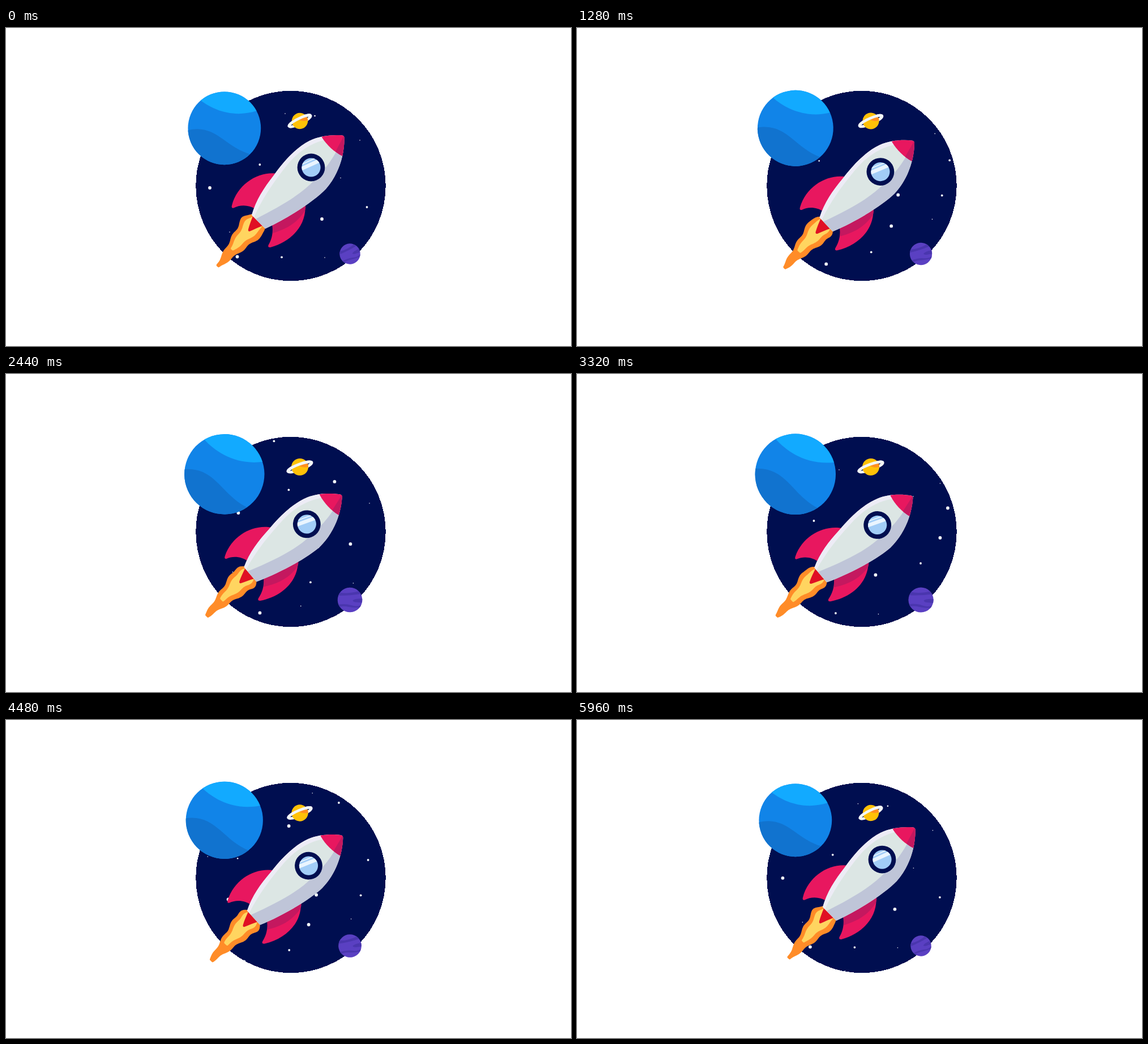
An HTML page that plays this animation: 998 px wide and 561 px high, repeating every 6 s.

```html
<!DOCTYPE html>
<html lang="en">
<head>
<meta charset="utf-8">
<title>Rocket in space</title>
<style>
html, body { margin: 0; width: 100%; height: 100%; overflow: hidden; background: #fff; }
svg { display: block; width: 998px; height: 561px; }
</style>
</head>
<body>
<svg viewBox="0 0 998 561">
  <defs>
    <clipPath id="skyClip"><circle cx="503" cy="278.500" r="167.700"/></clipPath>
    <clipPath id="planetClip"><circle r="64.400"/></clipPath>
    <clipPath id="moonClip"><circle r="18.200"/></clipPath>
    <clipPath id="saturnClip"><circle r="14.200"/></clipPath>
    <clipPath id="glass"><circle cx="539" cy="246" r="16.600"/></clipPath>
    <path id="hull" d="M434 330C442 303 455 283 473 260C489 237 512 211 536 199C554 190 577 188 593 189.300Q597.500 189.700 597.600 194C598 225 587 259 565 284C547 303 503 333 458 354Z"/>
    <clipPath id="hullClip"><use href="#hull"/></clipPath>
  </defs>

  <circle cx="503" cy="278.500" r="167.700" fill="#000e50" shape-rendering="crispEdges"/>
  <g clip-path="url(#skyClip)"><g id="stars" fill="#f3f8fb"></g></g>

  <g id="saturn">
    <ellipse rx="21.200" ry="4.600" fill="none" stroke="#f3f6f6" stroke-width="4.600"/>
    <circle r="14.200" fill="#ffc107"/>
    <path d="M-1 -3L16 -4V5Q5 5 -1 -3Z" fill="#ff9020" clip-path="url(#saturnClip)"/>
    <path d="M-21.200 0A21.200 4.600 0 0 1 21.200 0" fill="none" stroke="#f3f6f6" stroke-width="4.600"/>
  </g>

  <g id="planet">
    <circle r="64.400" fill="#1184e8"/>
    <g clip-path="url(#planetClip)">
      <path d="M-42 -49C-21 -33 15 -17 58 -31V-70H-70Z" fill="#12aaff"/>
      <path d="M-66 4C-16 -9 0 33 46 46V70H-70Z" fill="#1173cf"/>
    </g>
  </g>

  <g id="moon">
    <circle r="18.200" fill="#5a40c2"/>
    <g clip-path="url(#moonClip)" fill="#4a36ae">
      <path d="M-16 -12Q-2 -8 16 -13V-8Q0 -6 -18 -7Z"/>
      <path d="M19 -1Q8 -2 4 1Q5 4 11 4L19 5Z"/>
      <path d="M-18 6Q-6 5 2 8T17 8V12Q5 12 -3 10T-17 10Z"/>
    </g>
  </g>

  <g id="rocket">
    <path d="M480 257C446 252 409 275 399 313Q397.500 318.500 402 317.500C414 311 429 312 440 319Z" fill="#e8175f"/>
    <path d="M528 308C533 345 507 376 467 387Q462 387.500 463.500 383C471 370 472 358 470 345Z" fill="#e8175f"/>
    <path d="M528 308Q531 318 527 324C512 346 494 355 471 362Q472 355 470 345Z" fill="#c4185f"/>
    <g stroke-width="4" stroke-linejoin="round">
      <path id="outer" fill="#ff8c28" stroke="#ff8c28"/>
      <path id="inner" fill="#ffd560" stroke="#ffd560"/>
    </g>
    <path d="M436 332L453 349C445 352 439 355 431 358.600Q427 359.500 428 355C430 347 433 340 436 332Z" fill="#e01024"/>
    <use href="#hull" fill="#dce6e4"/>
    <g clip-path="url(#hullClip)">
      <path d="M434 330L438 334C453 300 474 270 497 241C517 217 540 202 566 197L560 180H500L420 300Z" fill="#edecf6"/>
      <path d="M441 337C488 313 522 293 546 267C561 252 574 236 585 215L610 220L570 300L458 360Z" fill="#bfc5d8"/>
      <path d="M558 193C567 207 580 219 594.500 226L605 226V180H558Z" fill="#e8175f"/>
      <path d="M597 190L582 218Q588 223 594.500 226L605 226V190Z" fill="#c4185f"/>
    </g>
    <circle cx="539" cy="246" r="24.400" fill="#000e50"/>
    <circle cx="539" cy="246" r="16.600" fill="#a2cdf7"/>
    <g clip-path="url(#glass)" stroke="#eaf5ff">
      <path d="M518 250L560 231" stroke-width="6.500"/>
      <path d="M518 242.500L560 223.500" stroke-width="1.800"/>
    </g>
  </g>
</svg>
<script>
const LOOP = 6000, STEP = 40, TAU = 2 * Math.PI;
const el = id => document.getElementById(id);

// Star places at time zero; the whole field drifts down and to the left.
const near = [[360,282],[558,337],[408.5,403.5],[685,215],[673,270],[805,38.5],[833,148.5],[635,93.6],[947,83]];
const mid = [[448.3,241],[637.5,316],[487,404.3],[776,154],[762.5,216],[698,-33],[724,53],[912.6,128],[500,342]];
const far = [[493,151],[625,198],[591,264.5],[395,360],[563,405],[750,107],[745.3,258],[866.6,76.6],
  [838,217.6],[768.6,-37],[899.6,10],[1022,73],[401.6,224]];
const small = [[545.5,155],[821.5,-33.7]];
const layers = [[near, 2.9], [mid, 1.9], [far, 0.8], [small, 1.3]];
el('stars').innerHTML = layers.map(([list, r]) => list.flatMap(([x, y]) =>
  [0, 1].map(k => `<circle cx="${x + 552 * k}" cy="${y - 373 * k}" r="${r}"/>`)).join('')).join('');

// Flame edges: s runs from the nozzle to the tip, n across it.
// They swell out from the hull, then taper while ripples run down them.
function flame(length, left, right, tipLeft, tipRight, wave, t) {
  const side = (from, to, lag) => Array.from({ length: 41 }, (_, i) => {
    const k = i / 40, s = k * length;
    const swell = Math.sin(TAU / 4 * Math.min(1, s / 16));
    const ripple = wave * swell * (1 - 0.5 * k) * Math.cos(TAU * ((s - lag) / 32 - t / 1000));
    const n = (from + (to - from) * k) * (0.6 + 0.4 * swell) + Math.sign(from) * ripple;
    return [446 - 0.664 * s + 0.747 * n, 341 + 0.747 * s + 0.664 * n].map(v => v.toFixed(2)).join(' ');
  });
  return 'M' + [...side(left, tipLeft, 17), ...side(right, tipRight, 25).reverse()].join('L') + 'Z';
}

const place = (id, value) => el(id).setAttribute('transform', value);

function draw() {
  const t = Math.floor(performance.now() % LOOP / STEP) * STEP;
  const u = (1 - Math.cos(TAU * (t - 45) / LOOP)) / 2;
  place('stars', `translate(${-0.09205 * t} ${0.06205 * t})`);
  place('planet', `translate(385.8 176.8) rotate(${11.5 * u}) scale(${1 + 0.108 * u})`);
  place('moon', `translate(607.5 398.5) rotate(${25 * u - 25}) scale(${1 + 0.22 * u})`);
  place('saturn', `translate(519 164) rotate(${6 * u - 26}) scale(${1 + 0.06 * u})`);
  place('rocket', `translate(${-8.5 * u} ${20.9 * u}) rotate(${4.75 * u} 539 246)`);
  el('outer').setAttribute('d', flame(106, -26.5, 22.5, -2.5, 1, 2, t));
  el('inner').setAttribute('d', flame(67, -18, 13, -4, -0.5, 1.6, t));
  requestAnimationFrame(draw);
}
draw();
</script>
</body>
</html>
```
